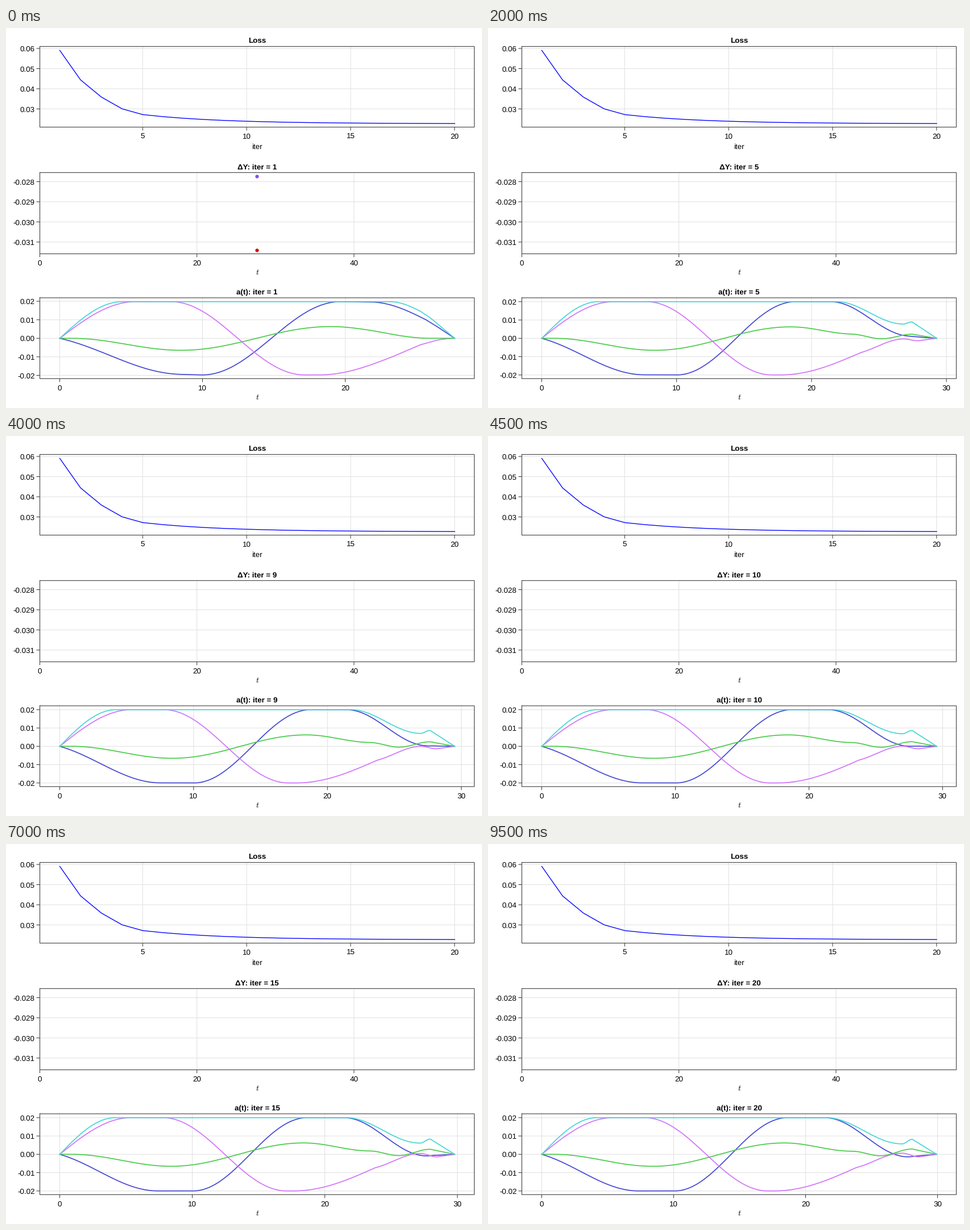
Write a matplotlib script that moves like this. It is 837 px wide and 669 px high and loops after 10000 ms.

```python
import matplotlib as mpl
import matplotlib.pyplot as plt
import numpy as np
from matplotlib.animation import FuncAnimation

W, H, DPI = 837, 669, 64
PT = 72 / DPI  # points per pixel
LEFT, RIGHT = 59.5, 823.5
X0, X1, MID = 94.5, 789.0, 441.5
ZERO, UNIT = 546.3, 64.5
FONT = 13.35

mpl.rcParams.update({
    "font.family": "Liberation Sans",
    "mathtext.fontset": "cm",
    "text.hinting": "no_hinting",
})


def lin(s):
    return s


def ease_in(s):
    return 1 - np.cos(np.pi * s / 2)


def ease_out(s):
    return np.sin(np.pi * s / 2)


def ease(s):
    return (1 - np.cos(np.pi * s)) / 2


def soft(s):
    return (ease_out(s) + ease(s)) / 2


# Key points (x, value, easing towards it) of the first and the settled curve.
CURVES = {
    "#4346d3": (
        [(312, -0.985, soft), (345, -1, lin), (588, 1, ease), (640, 0.99, lin),
         (738, 0.51, ease_in), (758, 0.32, lin), (X1, 0, lin)],
        [(265, -1, soft), (328, -1, lin), (527, 1, ease), (592, 1, lin),
         (739, -0.07, ease), (755, -0.045, ease), (X1, 0, lin)],
    ),
    "#d273fb": (
        [(228, 1, ease_out), (290, 1, lin), (525, -1, ease), (550, -1, lin),
         (680, -0.5, ease_in), (728, -0.18, lin), (758, -0.05, lin),
         (X1, 0, ease_out)],
        [(220, 1, ease_out), (275, 1, lin), (492, -1, ease), (503, -1, lin),
         (648, -0.36, ease_in), (728, 0.03, soft), (758, -0.07, ease),
         (X1, 0, lin)],
    ),
    "#47cb47": (
        [(115, 0, lin), (308, -0.327, ease), (571, 0.32, ease),
         (640, 0.22, ease_in), (690, 0.078, lin), (746, 0, ease_out),
         (X1, 0, lin)],
        [(115, 0, lin), (290, -0.327, ease), (521, 0.31, ease),
         (640, 0.085, ease), (690, -0.04, ease), (746, 0.144, ease),
         (X1, 0, lin)],
    ),
    "#45d5d5": (
        [(205, 1, ease_out), (675, 1, lin), (728, 0.744, ease_in),
         (746, 0.56, lin), (X1, 0, lin)],
        [(192, 1, ease_out), (594, 1, lin), (728, 0.285, ease),
         (746, 0.41, ease), (X1, 0, lin)],
    ),
}


def trace(keys, n=60):
    """Eased path through the key points, starting at the origin."""
    s = np.linspace(0, 1, n)
    xs, vs = [], []
    x, v = X0, 0
    for kx, kv, f in keys:
        xs.append(x + (kx - x) * s)
        vs.append(v + (kv - v) * f(s))
        x, v = kx, kv
    return np.array([np.concatenate(xs), ZERO - UNIT * np.concatenate(vs)])


PATHS = [[trace(keys) for keys in pair] for pair in CURVES.values()]


def x_of_30(i):
    """Pixel position of t = 30: big early steps, then a slow settling."""
    if i < 2:
        return 847.5 - 18.75 * i
    return 810 - 19.5 * min(1, (i - 2) / 15) ** 0.8


def progress(i):
    return ((x_of_30(0) - x_of_30(i)) / (x_of_30(0) - x_of_30(19))) ** 0.8


fig = plt.figure(figsize=(W / DPI, H / DPI), dpi=DPI, facecolor="white")
ax = fig.add_axes([0, 0, 1, 1])
ax.set_xlim(0, W)
ax.set_ylim(H, 0)
ax.axis("off")


def line(x, y, color="black", lw=1.0, z=3, **kw):
    return ax.plot(x, y, color=color, lw=lw * PT, zorder=z, **kw)[0]


def label(x, y, s, ha="center", size=FONT, **kw):
    return ax.text(x, y, s, ha=ha, va="baseline", fontsize=size * PT, **kw)


def rule(x, y, color="#333333", z=3):
    return line(x, y, color, 1, z, solid_capstyle="butt", snap=False)


def ticks(top, bottom, xticks, yticks):
    """Grid lines, tick marks and tick labels at (pixel, text) pairs."""
    made = []
    for x, s in xticks:
        if x > LEFT:
            made.append(rule([x, x], [top, bottom], "#e0e0e0", 1))
        made.append(rule([x, x], [bottom, bottom + 6]))
        made.append(label(x, bottom + 20.5, s))
    for y, s in yticks:
        made.append(rule([LEFT, RIGHT], [y, y], "#e0e0e0", 1))
        made.append(rule([LEFT - 6, LEFT], [y, y]))
        made.append(label(50.7, y + 5, s, "right"))
    return made


def panel(top, bottom, title=""):
    line([LEFT, RIGHT, RIGHT, LEFT, LEFT], [top, top, bottom, bottom, top],
         "#4d4d4d", 1.2, 5, snap=False, solid_joinstyle="miter")
    return label(MID, top - 5.5, title, weight="bold")


# Loss panel
panel(32.5, 174.5, "Loss")
ticks(32.5, 174.5,
      [(240.4 + 182.8 * k, str(5 * k + 5)) for k in range(4)],
      [(36 + 35.5 * k, f"{0.06 - 0.01 * k:.2f}") for k in range(4)])
label(MID, 213, "iter")
loss = np.r_[39.3, 91.3, 121.5, 142.3, 168.5 - 16 * 0.77 ** np.arange(16)]
line(np.linspace(X0, X1, 20), loss, "#0000ff", 1.35, 4)

# Difference panel
diff_title = panel(254.5, 397.5)
ticks(254.5, 397.5,
      [(LEFT + 276.2 * k, str(20 * k)) for k in range(3)],
      [(270.5 + 35.45 * k, f"-{0.028 + 0.001 * k:.3f}") for k in range(4)])
label(442.8, 434, "$t$", size=14)
dots = [line([MID], [y], c, marker="o", ms=6.2 * PT, mew=0, ls="none")
        for y, c in ((260.8, "#7f52f2"), (390.7, "#e00000"))]

# Trajectory panel
curve_title = panel(475.0, 617.3)
label(442.8, 654, "$t$", size=14)
lines = [line([], [], color, 1.7, 4) for color in CURVES]
moving = []


def update(i):
    while moving:
        moving.pop().remove()
    step = (x_of_30(i) - X0) / 3
    xticks = [(X0 + k * step, str(10 * k)) for k in range(4)
              if X0 + k * step < RIGHT - 8]
    unit = 32.6 if i == 0 else UNIT / 2
    yticks = [(ZERO - k * unit, f"{k / 100:.2f}") for k in range(-2, 3)]
    moving.extend(ticks(475.0, 617.3, xticks, yticks))

    p = progress(i)
    for ln, (first, last) in zip(lines, PATHS):
        ln.set_data(*(first + (last - first) * p))
    for dot in dots:
        dot.set_visible(i == 0)
    diff_title.set_text(f"ΔY: iter = {i + 1}")
    curve_title.set_text(f"a(t): iter = {i + 1}")
    return lines


def reset():
    return update(0)


anim = FuncAnimation(fig, update, frames=20, interval=500, init_func=reset,
                     repeat=True, repeat_delay=0, blit=False)
plt.show()
```
